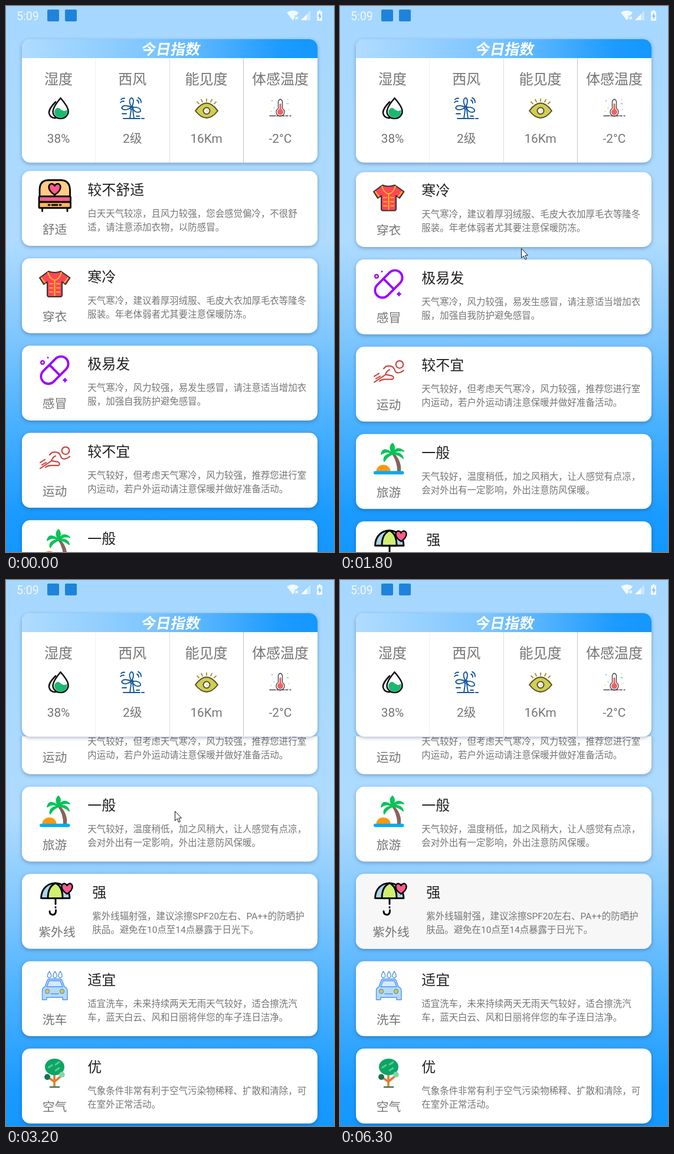
Animation, 556 px wide and 922 px high, one loop 6.6 s. Source, as an HTML page:

```html
<!DOCTYPE html>
<html lang="zh-CN">
<head>
<meta charset="utf-8">
<style>
html, body { margin: 0; width: 100%; height: 100%; overflow: hidden; background: #a9d9ff }
svg { display: block; width: 556px; height: 922px; font-family: Roboto, 'Noto Sans CJK SC', 'Noto Sans CJK', sans-serif }
.shadow { filter: drop-shadow(0 2px 3px rgba(0, 30, 70, .32)) }
.title { font-size: 24px; fill: #212121 }
.body { font-size: 15.46px; fill: #757575 }
.label { font-size: 20.8px; fill: #757575; text-anchor: middle }
.head { font-size: 24px; fill: #757575; text-anchor: middle }
.line { fill: none; stroke-linecap: round; stroke-linejoin: round }
</style>
</head>
<body>
<svg viewBox="0 0 556 922">
  <defs>
    <linearGradient id="sky" x2="0" y2="1">
      <stop stop-color="#a6d7ff"/><stop offset=".43" stop-color="#aedbff"/>
      <stop offset=".6" stop-color="#80c7ff"/><stop offset=".77" stop-color="#48b0ff"/>
      <stop offset=".93" stop-color="#1a9aff"/><stop offset="1" stop-color="#1497ff"/>
    </linearGradient>
    <linearGradient id="strip">
      <stop stop-color="#b0dcff"/><stop offset=".45" stop-color="#7cc5ff"/><stop offset=".88" stop-color="#1c9aff"/><stop offset="1" stop-color="#1497ff"/>
    </linearGradient>
    <clipPath id="below"><path d="M0 264H556V922H0Z"/></clipPath>
    <clipPath id="round"><rect x="27" width="501" height="126.5" rx="14"/></clipPath>
  </defs>
  <path d="M0 0H556V922H0Z" fill="url(#sky)"/>

  <g fill="#fff" fill-opacity=".85">
    <text x="18" y="24" font-size="19.6">5:09</text>
    <path d="M476 11Q486 4 496 11L492.500 16H489V21L486 24Z"/>
    <path d="M490.500 18L495 22.500M495 18L490.500 22.500" stroke="#fff" stroke-width="1.400"/>
    <path d="M500 24L516 8V24Z" fill-opacity=".4"/><path d="M500 24L510 14V24Z"/>
    <path d="M528 9H530V7H533V9H535Q536 9 536 10V24Q536 25 535 25H528Q527 25 527 24V10Q527 9 528 9Z"/>
    <path d="M532.500 11L528.500 18H531V23L535 16H532.500Z" fill="#6dbdf8"/>
  </g>
  <g fill="#1f83dc"><rect x="70" y="6" width="20" height="20" rx="2"/><rect x="100" y="6" width="20" height="20" rx="2"/></g>

  <g clip-path="url(#below)"><g id="list"></g></g>

  <g class="shadow">
    <rect x="27" y="56" width="501" height="208.500" rx="14" fill="#fff"/>
    <path d="M27 88V70A14 14 0 0 1 41 56H514A14 14 0 0 1 528 70V88Z" fill="url(#strip)"/>
  </g>
  <text transform="translate(278 82) skewX(-10)" text-anchor="middle" font-size="25" font-weight="700" fill="#fff">今日指数</text>
  <path d="M151.500 88V264" stroke="#f0f1f4"/><path d="M277.500 88V264" stroke="#dcdcdc"/><path d="M402.500 88V264" stroke="#c4c4b6"/>
  <g id="heads"></g>

  <g class="line" stroke="#111" stroke-width="2.600">
    <path d="M84 162Q72 174 73 181Q75 190 85 189"/>
    <path d="M92.500 155.500Q106 171 105.500 178A13 12 0 0 1 79.500 178Q80 170 92.500 155.500Z" fill="#fff"/>
    <path d="M82 177Q87 169 92 174Q98 180 103.500 175Q105 188 92.500 188.500Q82 188 82 177Z" fill="#19ba70" stroke="none"/>
  </g>
  <g class="line" stroke="#17599d" stroke-width="1.900">
    <path d="M213 171Q206 158 213 155Q219 158 213 171Q199 165 196 172Q200 179 213 171Q220 183 228 178Q229 170 213 171"/>
    <circle cx="213" cy="172" r="2.500"/>
    <path d="M212 176L210 190M215 176L217 190M199 190H227M230 190H234M195 158Q197 155 201 156M194 163Q196 160 200 161M224 155Q229 157 229 163M222 159Q225 160 225 164M197 182H204M221 186H226"/>
  </g>
  <g class="line" stroke="#5c4d2c" stroke-width="2">
    <path d="M321 177Q340 151 359 177Q340 201 321 177Z" fill="#cfcf51"/>
    <circle cx="340" cy="177" r="5.500" fill="#fff"/><circle cx="341" cy="177" r="2.300" fill="#e8e8c8" stroke="none"/>
    <path d="M340 157V161M331 158L333 162M349 158L347 162M324 162L327 165M356 162L353 165" stroke="#a39b3c"/>
  </g>
  <g class="line" stroke="#444" stroke-width="1.400">
    <path d="M461.500 173V161Q465 154 468.500 161V173A7 7 0 1 1 461.500 173Z" fill="#fff"/>
    <circle cx="465" cy="179" r="5" fill="#f26161" stroke="none"/><path d="M465 166V178" stroke="#f26161" stroke-width="3"/>
    <path d="M447 185.500H457M459 185.500H472M474 185.500H478M481 185.500H483"/>
    <path d="M450 160H452M476 165H479M454 172H455" stroke="#69cfe8"/><path d="M477 158H478M449 178H450M479 175H480" stroke="#f1c75c"/>
  </g>

  <path id="arrow" d="M.5 .5V16.500L4.300 13L6.800 19L9.300 18L6.800 12H11.500Z" fill="#fff" stroke="#111"/>
</svg>
<script>
const TOP = 278.5, PITCH = 147.45, LOOP = 6600;
const heart = (x, y, s) => `<path transform="translate(${x} ${y}) scale(${s})" d="M0 10C-15 0-11-10-5-10Q-1-9 0-6Q1-9 5-10C11-10 15 0 0 10Z" fill="#ff5a8c" stroke="#000" stroke-width="2.7"/>`;
const drop = x => `<path d="M${x} 17q4 6 3 9q-3 4-6 0q-1-3 3-9Z"/>`;

const icons = {
  bed: `<g class="line" stroke="#000" stroke-width="2.8">
    <path d="M57 43V32Q57 16 72 15.500H93Q108 16 108.500 32V43Z" fill="#ffcb85"/>${heart(82.5, 31, .95)}
    <rect x="56" y="43" width="53.500" height="9.500" rx="2" fill="#ff5a8c"/><rect x="56" y="52.500" width="53.500" height="10" rx="1" fill="#ffb755"/>
    <path d="M61.500 63V68M104 63V68M72 57.500H74M78 57.500H87M91 57.500H93"/></g>`,
  shirt: `<g class="line" stroke="#333" stroke-width="2">
    <path d="M72 22L57 33L64 44L70 40V62Q70 65 73 65H92Q95 65 95 62V40L101 44L108.500 33L93 22Q82 26 72 22Z" fill="#ff4658"/>
    <path d="M71 24Q75 36 82.500 37Q90 36 94 24M82.500 37V63M74 43H79M86 43H91M74 50H79M86 50H91M74 57H79M86 57H91M60 33L66 41M105 33L99 41" stroke="#ffc21c" stroke-width="1.900"/></g>`,
  pill: `<g class="line" stroke="#9c00ff" stroke-width="3.800">
    <g transform="translate(82.500 41.500) rotate(-45)"><rect x="-27.500" y="-12.500" width="55" height="25" rx="12.500"/><path d="M0-12V12"/></g>
    <circle cx="62" cy="28.500" r="2.800" stroke-width="2.300"/><path d="M71 20.500H71.100M97.500 58.500H102.500M100 56V61" stroke-width="2.800"/></g>`,
  run: `<g class="line" stroke="#ce4743" stroke-width="2.200">
    <circle cx="101" cy="30" r="6.300"/>
    <path d="M78 33Q88 31 91 36L94 42Q98 47 108 40M84 39Q79 41 77 47L88 49Q93 52 89 55H76Q71 55 67 58M78 33L74 37M58 50L66 45M58 60L76 48M61 54L68 50"/></g>`,
  palm: `<path d="M88 34Q97 46 97 63H103Q105 45 91 32Z" fill="#85665a"/>
    <path d="M89 33Q82 22 89 16Q95 22 89 33Q97 19 108 29Q99 26 91 32Q105 31 107 41Q98 33 89 34Q80 37 75 46Q72 36 87 33Q79 27 70 34Q73 20 89 33Z" fill="#06c458" stroke="#06c458" stroke-width="2" stroke-linejoin="round"/>
    <path d="M61.500 63A12 11 0 0 1 85.500 63Z" fill="#ff9808"/><rect x="57" y="62.500" width="51.500" height="5.800" rx="2.900" fill="#08a9f4"/>`,
  umbrella: `<g class="line" stroke="#000" stroke-width="2.900">
    <path d="M59.500 41C60 7 107 7 108 41Z" fill="#a9d3ec"/><path d="M71 41Q71 21 84 15.500Q96 21 96 41Z" fill="#d0ef70"/>
    <path d="M84 41V51M84 56V57M74 63Q74 69 80 69Q85 68 84.500 61"/>${heart(103.5, 25, .88)}</g>`,
  car: `<g class="line" stroke="#4f95ee" stroke-width="1.400">
    <path d="M66 43L70 32Q71 30 74 30H91Q94 30 95 32L99 43Q104 45 104 50V65H96V61H69V65H61.500V50Q61 45 66 43Z" fill="#b5d9ff"/>
    <path d="M69 43L73 33H92L96 43Z" fill="#d5eaff"/><path d="M76 55H89"/>
    <circle cx="70" cy="51" r="3.500" fill="#ffc800"/><circle cx="95" cy="51" r="3.500" fill="#ffc800"/>${drop(73.5)}${drop(83)}${drop(92)}</g>`,
  tree: `<g class="line" stroke="#df7d35" stroke-width="3.600"><path d="M82 42V64M82 56L72 49M82 56L94 46"/><path d="M75 65H90" stroke="#3f7a4c" stroke-width="2.500"/></g>
    <ellipse cx="82.500" cy="31" rx="16.500" ry="14" fill="#0ca564"/><circle cx="70" cy="48" r="5" fill="#16724b"/><circle cx="95" cy="44" r="4.800" fill="#83d8a7"/>
    <path d="M72 32L78 28M84 27L90 23M84 37L90 33" stroke="#57cc94" stroke-width="3" stroke-linecap="round"/>`
};

const cards = [
  ['bed', '舒适', '较不舒适', '白天天气较凉，且风力较强，您会感觉偏冷，不很舒', '适，请注意添加衣物，以防感冒。'],
  ['shirt', '穿衣', '寒冷', '天气寒冷，建议着厚羽绒服、毛皮大衣加厚毛衣等隆冬', '服装。年老体弱者尤其要注意保暖防冻。'],
  ['pill', '感冒', '极易发', '天气寒冷，风力较强，易发生感冒，请注意适当增加衣', '服，加强自我防护避免感冒。'],
  ['run', '运动', '较不宜', '天气较好，但考虑天气寒冷，风力较强，推荐您进行室', '内运动，若户外运动请注意保暖并做好准备活动。'],
  ['palm', '旅游', '一般', '天气较好，温度稍低，加之风稍大，让人感觉有点凉，', '会对外出有一定影响，外出注意防风保暖。'],
  ['umbrella', '紫外线', '强', '紫外线辐射强，建议涂擦SPF20左右、PA++的防晒护', '肤品。避免在10点至14点暴露于日光下。'],
  ['car', '洗车', '适宜', '适宜洗车，未来持续两天无雨天气较好，适合擦洗汽', '车，蓝天白云、风和日丽将伴您的车子连日洁净。'],
  ['tree', '空气', '优', '气象条件非常有利于空气污染物稀释、扩散和清除，可', '在室外正常活动。']
];
const heads = [['湿度', '38%'], ['西风', '2级'], ['能见度', '16Km'], ['体感温度', '-2°C']];

const $ = id => document.getElementById(id);
const text = (cls, x, y, s) => `<text class="${cls}" x="${x}" y="${y}">${s}</text>`;

$('list').innerHTML = cards.map(([icon, label, title, a, b], i) => {
  const dx = label.length > 2 ? 8 : 0, x = 138.3 + dx;
  const press = icon == 'pill' ? '<path id="tint" d="M27 0H528V127H27Z" fill="#d6ecfe"/>'
    : icon == 'umbrella' ? '<circle id="ripple" cx="293" cy="69" fill="#f7f7f7"/>' : '';
  return `<g transform="translate(0 ${TOP + i * PITCH})">
    <rect class="shadow" x="27" width="501" height="126.5" rx="14" fill="#fff"/>
    <g clip-path="url(#round)">${press}</g>${icons[icon]}
    ${text('label', 82.5 + dx / 2, 106, label)}${text('title', x, 40, title)}
    ${text('body', x, 77, a)}${text('body', x, 100, b)}</g>`;
}).join('');

$('heads').innerHTML = heads.map(([name, value], i) =>
  text('head', 89 + i * 125.3, 131.5, name) + text('label', 89 + i * 125.3, 230.5, value)).join('');

// Each key: time in ms, then values
const scrollKeys = [[1100, 0], [1200, 6], [1300, 18], [1400, 40], [1500, 67], [1700, 121], [1800, 145.5], [1900, 190],
  [2000, 235], [2100, 266], [2200, 281.5], [2300, 286], [2500, 292], [2600, 318], [2700, 360], [2900, 450], [3000, 483], [3100, 507], [3200, 519.4]];
const arrowKeys = [[500, 481, 155], [600, 434, 250], [700, 375, 380], [800, 330, 490], [900, 300, 565], [1000, 291, 593], [1100, 300, 599],
  [1200, 301, 586], [1500, 301, 498], [1800, 307, 409], [1900, 308, 425], [2200, 308, 569], [2400, 308, 650], [2500, 305, 648],
  [2700, 294, 575], [2900, 286, 486], [3100, 286, 415], [3200, 286, 390], [3300, 286, 371], [3400, 286, 371], [3500, 288, 430],
  [3600, 282, 543], [3700, 266, 620], [3900, 251, 720], [4000, 246, 767], [4100, 243, 741], [4300, 256, 648],
  [4500, 256, 648], [4700, 272, 615], [5000, 293, 565], [5800, 293, 565], [5900, 330, 520], [6000, 374, 456], [6200, 544, 195]];
const tintKeys = [[1100, 0], [1200, .5], [1300, 1], [1500, 1], [1800, 0]];

function at(keys, t) {
  const i = keys.findIndex(k => k[0] > t);
  if (i < 0) return keys[keys.length - 1].slice(1);
  if (!i) return keys[0].slice(1);
  const a = keys[i - 1], b = keys[i], u = (t - a[0]) / (b[0] - a[0]);
  return a.slice(1).map((v, j) => v + (b[j + 1] - v) * u);
}

const start = performance.now();
function draw(now) {
  // The screen refreshes every 100 ms
  const t = Math.floor(Math.max(0, now - start) % LOOP / 100) * 100;
  $('list').setAttribute('transform', `translate(0 ${-at(scrollKeys, t)[0]})`);
  $('arrow').setAttribute('transform', `translate(${at(arrowKeys, t).map(Math.round)})`);
  $('arrow').setAttribute('visibility', t >= 500 && t < 6300 ? 'visible' : 'hidden');
  $('tint').setAttribute('opacity', at(tintKeys, t)[0]);
  $('ripple').setAttribute('r', t < 5200 ? 0 : Math.min(280, 80 + (t - 5200) * .67));
  requestAnimationFrame(draw);
}
draw(start);
</script>
</body>
</html>
```
